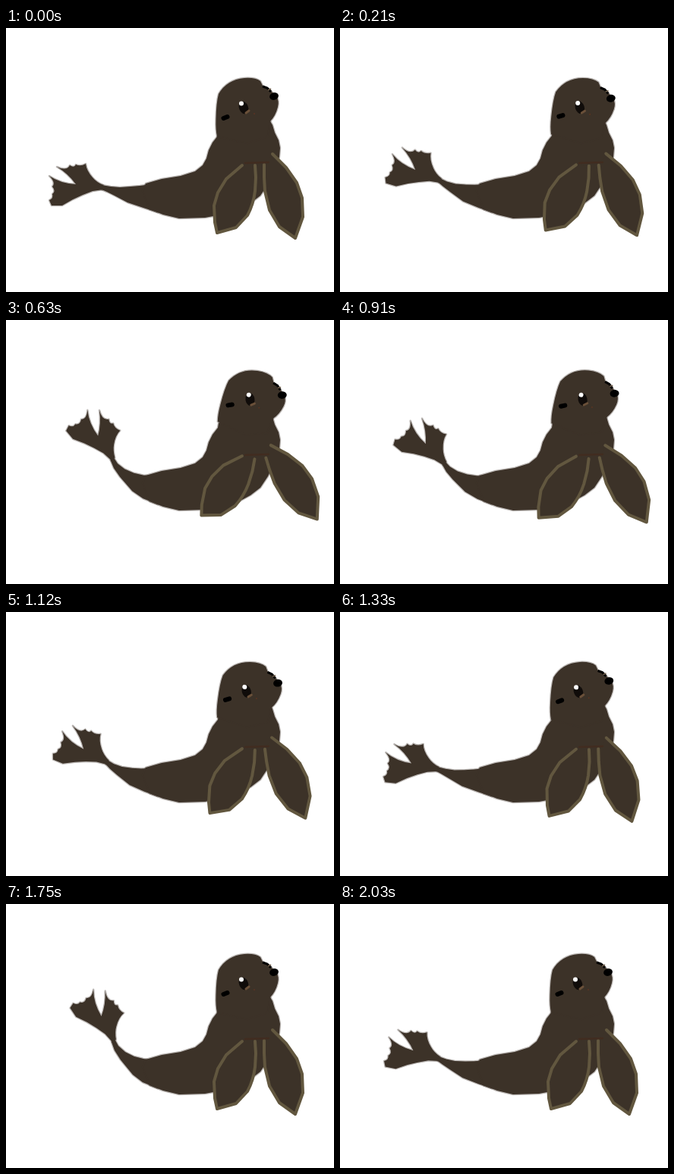
Write an HTML page that moves like this. It is 432 by 348 pixels and loops after 2.1 s.

```html
<!DOCTYPE html>
<html>
<head>
<meta charset="utf-8">
<style>
html, body { margin: 0; width: 100%; height: 100%; overflow: hidden; background: #fff; }
svg { display: block; }
.skin { fill: #3c3228; stroke: #3c3228; stroke-opacity: .35; stroke-width: 2.5; stroke-linejoin: round; }
.flipper { fill: #3c3228; stroke: #62573f; stroke-width: 4; stroke-linecap: round; stroke-linejoin: round; }
</style>
</head>
<body>
<svg width="432" height="348" viewBox="0 0 432 348">
  <path id="tail" class="skin"/>
  <path id="fluke" class="skin" d="M128 207 Q119 203 114 197 Q106 188 105 179 Q98 183 92 180 Q90 185 84 181
    Q80 189 67 183 Q82 192 92 206 Q72 205 57 195 Q66 204 61 209 Q66 215 61 219 Q63 224 57 227 L60 234
    L74 234 L88 226 L101 220 L114 215 L128 213Z"/>
  <path class="skin" d="M280 136 L279 142 L272 151 L267 161 L264 172 L259 181 L249 189 L230 195 L205 199 L184 205
    L180 215 L189 239 L207 246 L228 251 L262 250 L300 243 L322 231 L335 221 L345 206 L355 185 L360 170 L361 158
    L359 148 L354 138 L351 128 L345 118 L318 116Z"/>
  <g id="head">
    <path class="skin" d="M278 143 Q276 134 276.500 120 Q277 98 280 87 Q291 68 314 66 Q328 65 335 70 L338 76
      L347 81 L356 90 Q360 96 358 104 Q355 116 348 123 L345 143 L318 152Z"/>
    <path d="M338 77 L344 79 L349 84" fill="none" stroke="#000" stroke-width="3"/>
    <path d="M345 82 L349 80" stroke="#766450" stroke-width="1.500"/>
    <ellipse cx="353" cy="90" rx="6" ry="4.800" transform="rotate(-18 353 90)"/>
    <path d="M286.500 119 L291.500 117" stroke="#000" stroke-width="6" stroke-linecap="round"/>
    <ellipse cx="313" cy="105" rx="6" ry="8.500" fill="#100c0a" transform="rotate(-22 313 105)"/>
    <path d="M316 112 L320 109" stroke="#6a5039" stroke-width="3" stroke-linecap="round"/>
    <circle cx="310" cy="99.500" r="3" fill="#fff"/>
    <circle cx="327" cy="113" r="1" fill="#5a3522"/>
  </g>
  <path id="left" class="flipper" d="M311 181 L290 199 L279 217 L274 234 L275 256 L278 270 L303 263 L318 247
    Q326 232 328 215 L329 197 L328 181"/>
  <path id="right" class="flipper" d="M351 166 L369 184 L383 204 L390 224 L391 249 L381 277 L360 262 L347 240
    L341 215 L340 197 L340 180"/>
  <path d="M315 178 L346 177" stroke="#412c20" stroke-width="2.500" stroke-linecap="round"/>
</svg>
<script>
const STEP = 70, COUNT = 30;
const $ = id => document.getElementById(id);

// x, y with the tail down, then the shift when it is fully raised
const tailPoints = [
  [126, 207, 16, -31], [138, 209, 10, -22], [150, 210, 7, -15], [164, 209, 5, -8], [176, 208, 5, -4],
  [192, 206, 0, 0], [200, 243, 0, 0], [184, 238, -4, -3], [160, 230, 7, -5], [143, 221, 8, -15.5],
  [133, 216, 10, -23], [126, 213, 13, -31]
];

const rotate = (degrees, x, y) => `rotate(${degrees} ${x} ${y})`;
const turn = (id, transform) => $(id).setAttribute('transform', transform);

function draw(now) {
  const n = Math.floor(now / STEP) % COUNT;
  const slow = Math.max(0, 1 - Math.abs(n - 10) / 10);
  const lift = n < 20 ? slow : 1 - Math.abs(n - 25) / 5;

  turn('head', rotate(14.4 * slow, 318.5, 142));
  turn('left', rotate(15.6 * slow, 318, 180));
  turn('right', rotate(-18.8 * slow, 347, 173));
  turn('fluke', `translate(${15.5 * lift} ${-32 * lift})` + rotate(56 * lift, 125.5, 210));
  const outline = tailPoints.map(([x, y, dx, dy]) => [x + dx * lift, y + dy * lift]);
  $('tail').setAttribute('d', 'M' + outline.join('L') + 'Z');
  requestAnimationFrame(draw);
}
draw(performance.now());
</script>
</body>
</html>
```
